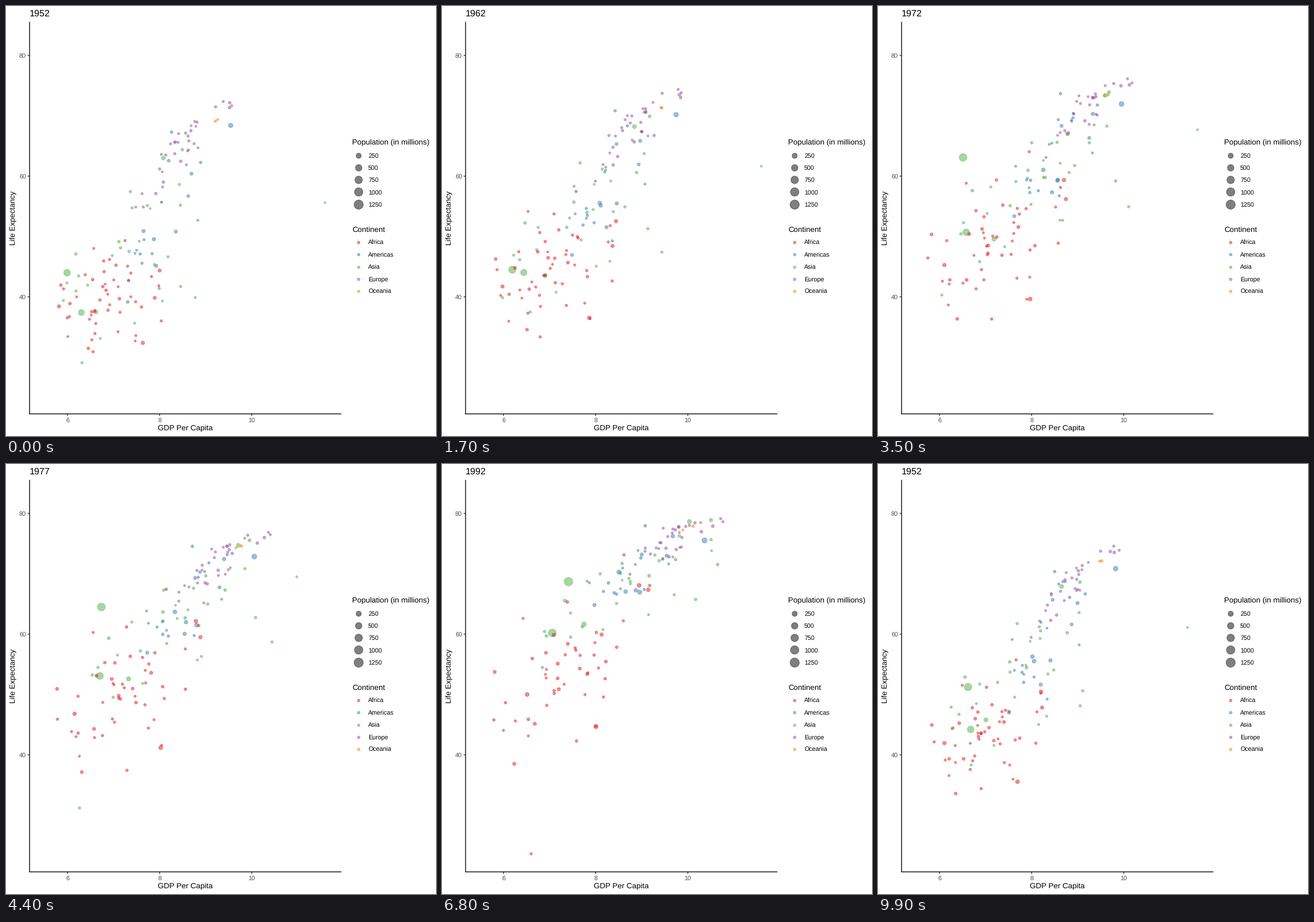
Recreate the animation shown at these times as a matplotlib script. Size 748 by 748 pixels, loop 10 s.

```python
import numpy as np
import matplotlib.pyplot as plt
from matplotlib.animation import FuncAnimation
from matplotlib.colors import to_rgba

W = H = 748
DPI = 100
PT = 72 / DPI                       # points per pixel
N_FRAMES, STEP = 100, 100
YEARS = np.arange(1952, 2008, 5)
AGE = (YEARS - 1952) / 55           # 0 at the first year, 1 at the last
STARTS = [5 + 9 * j - max(0, j - 4) for j in range(12)]
TWEEN = 4
MAX_POP = 1319
SMALL, MEDIUM, LARGE = 10.7, 13.35, 16.1

AFRICA, AMERICAS, ASIA, EUROPE, OCEANIA = range(5)
NAMES = ["Africa", "Americas", "Asia", "Europe", "Oceania"]
COLORS = ["#E41A1C", "#377EB8", "#4DAF4A", "#984EA3", "#FF7F00"]

plt.rcParams["font.family"] = "Liberation Sans"
plt.rcParams["text.hinting"] = "none"
rng = np.random.default_rng(4)
dots = []                           # (group, x, y, size), one value per year


def px(x):
    return 107 + 80.15 * (x - 6)


def py(y):
    return 86 - 10.5 * (y - 80)


def point_size(pop):
    return 1 + 5 * np.sqrt(pop / MAX_POP)


def area(size):
    return (0.9075 * (2.845 * size + 0.94) * PT) ** 2


def grow(start, gain):
    return point_size(start * gain ** AGE)


def track(group, pop, gain, *points):
    """One notable dot that follows a few (year, x, y) points."""
    t, x, y = zip(*points)
    dots.append((group, np.interp(YEARS, t, x), np.interp(YEARS, t, y),
                 grow(pop, gain)))


def latent(n):
    z = rng.standard_normal(n)
    return np.clip((z - z.mean()) / z.std(), -1.75, 1.9)


def soft_cap(y, top, k=1.2):
    return top - k * np.log1p(np.exp((top - y) / k))


def cloud(group, n, gain, mx, sx, my, sy, rho, power=1.4):
    """A drifting group: centre, spread and slope ease from start to end."""
    ease = 1 - (1 - AGE) ** power
    mx, sx, my, sy, rho = (a + (b - a) * ease for a, b in (mx, sx, my, sy, rho))
    turn = 0.7 * AGE
    u0, u1, v0, v1 = (latent(n) for _ in range(4))
    pops = np.clip(rng.lognormal(1.7, 1.1, n), 0.3, 70)
    for i in range(n):
        u = u0[i] * np.cos(turn) + u1[i] * np.sin(turn)
        u = np.clip(u, -1.75, 1.9)
        v = v0[i] * np.cos(turn) + v1[i] * np.sin(turn)
        x = mx + sx * u + rng.normal(0, 0.04, len(YEARS))
        y = my + sy * (rho * u + np.sqrt(1 - rho ** 2) * v)
        y += rng.normal(0, 0.25, len(YEARS))
        dots.append((group, x, soft_cap(y, 73.2 + 8.5 * AGE),
                     grow(pops[i], gain)))


cloud(AFRICA, 51, 3.0, mx=(6.9, 7.45), sx=(0.6, 0.95), my=(39.4, 54.8),
      sy=(4.9, 9), rho=(0.25, 0.6), power=2)
cloud(AMERICAS, 23, 2.5, mx=(8.06, 8.95), sx=(0.48, 0.56), my=(53.5, 74),
      sy=(8.4, 3.6), rho=(0.6, 0.7))
cloud(ASIA, 26, 2.8, mx=(7.35, 9), sx=(0.78, 1.08), my=(47, 72.5),
      sy=(8.2, 5.2), rho=(0.5, 0.8))
cloud(EUROPE, 30, 1.3, mx=(8.55, 9.95), sx=(0.52, 0.53), my=(65.3, 77.9),
      sy=(4.8, 2.4), rho=(0.92, 0.85))

track(ASIA, 556, 2.4, (1952, 5.99, 44), (1962, 6.19, 44.5),
      (1972, 6.51, 63.1), (1992, 7.41, 68.7), (2007, 8.51, 73))
track(ASIA, 372, 3.0, (1952, 6.3, 37.4), (1972, 6.58, 50.7),
      (1992, 7.06, 60.2), (2007, 7.8, 64.7))
track(ASIA, 86, 1.5, (1952, 8.08, 63), (1972, 9.6, 73.4), (2007, 10.36, 82.6))
track(ASIA, 82, 2.7, (1952, 6.62, 37.5), (2007, 8.17, 70.7))
track(ASIA, 0.2, 12, (1952, 11.59, 55.6), (1972, 11.6, 67.7),
      (1982, 10.35, 71.3), (2007, 10.76, 77.6))
track(ASIA, 4, 6.7, (1952, 8.77, 39.9), (1977, 10.44, 58.7), (2007, 9.9, 72.8))
track(ASIA, 5, 2.8, (1952, 5.91, 39.4), (1972, 6.05, 40.3),
      (1977, 6.26, 31.2), (1982, 6.44, 51), (2007, 7.45, 59.7))
track(AMERICAS, 158, 1.9, (1952, 9.54, 68.4), (2007, 10.67, 78.2))
track(AMERICAS, 57, 3.3, (1952, 7.65, 50.9), (1977, 8.8, 61.5),
      (2007, 9.11, 72.4))
track(AFRICA, 2.5, 3.5, (1952, 6.2, 40), (1987, 6.74, 44), (1992, 6.6, 23.6),
      (1997, 6.38, 36.1), (2007, 6.76, 46.2))
track(OCEANIA, 9, 2.2, (1952, 9.21, 69.1), (2007, 10.45, 81.2))
track(OCEANIA, 2, 2, (1952, 9.26, 69.4), (2007, 10.13, 80.2))

dots = [dots[i] for i in rng.permutation(len(dots))]
tints = [to_rgba(COLORS[d[0]], 0.5) for d in dots]
xs, ys, sizes = (np.array([d[k] for d in dots]) for k in (1, 2, 3))

fig = plt.figure(figsize=(W / DPI, H / DPI), dpi=DPI, facecolor="white")
ax = fig.add_axes([0, 0, 1, 1])
ax.set(xlim=(0, W), ylim=(H, 0))
ax.axis("off")


def text(x, y, s, size, color="black", **kw):
    return ax.text(x, y, s, fontsize=size * PT, color=color, va="baseline",
                   **kw)


def line(x, y, color="black"):
    ax.plot(x, y, color=color, lw=1.35 * PT, solid_capstyle="butt",
            snap=False)


def bubbles(x, y, size, colors):
    return ax.scatter(x, y, s=area(size), facecolors=colors,
                      edgecolors=colors, linewidths=0.86 * PT, zorder=3)


# axes
for v in (6, 8, 10):
    line([px(v)] * 2, [709.5, 713], "#333333")
    text(px(v), 723.5, str(v), SMALL, "#4D4D4D", ha="center")
for v in (40, 60, 80):
    line([37.7, 41], [py(v)] * 2, "#333333")
    text(35, py(v) + 4, str(v), SMALL, "#4D4D4D", ha="right")
line([41, 41], [27.5, 710.1])
line([40.4, 583.5], [709.5, 709.5])
text(312.3, 738.5, "GDP Per Capita", MEDIUM, ha="center")
text(16.2, 368.5, "Life Expectancy", MEDIUM, ha="center", rotation=90,
     rotation_mode="anchor")

# legends
text(602.5, 241.5, "Population (in millions)", MEDIUM)
text(602.5, 392.5, "Continent", MEDIUM)
for i, name in enumerate(NAMES):
    pop, y = 250 * (i + 1), 260 + 21.15 * i
    bubbles([613], [y], point_size(pop), [(0, 0, 0, 0.5)])
    text(630, y + 4, str(pop), SMALL)
    y += 151.3
    bubbles([613], [y], 1.5, [to_rgba(COLORS[i], 0.5)])
    text(630, y + 4, name, SMALL)

title = text(41, 18, "1952", LARGE)
swarm = bubbles(px(xs[:, 0]), py(ys[:, 0]), sizes[:, 0], tints)


def phase(i):
    """State left, state entered and progress between them."""
    k = sum(s <= i for s in STARTS)
    if k == 0:
        return 0, 0, 1.0
    return k - 1, k % 12, min((i - STARTS[k - 1] + 1) / TWEEN, 1.0)


def update(i):
    a, b, p = phase(i)
    x, y, size = (v[:, a] * (1 - p) + v[:, b] * p for v in (xs, ys, sizes))
    swarm.set_offsets(np.column_stack([px(x), py(y)]))
    swarm.set_sizes(area(size))
    title.set_text(str(YEARS[b if p >= 0.5 else a]))
    return swarm, title


anim = FuncAnimation(fig, update, frames=N_FRAMES, interval=STEP,
                     repeat=True, repeat_delay=0, blit=False)
plt.show()
```
